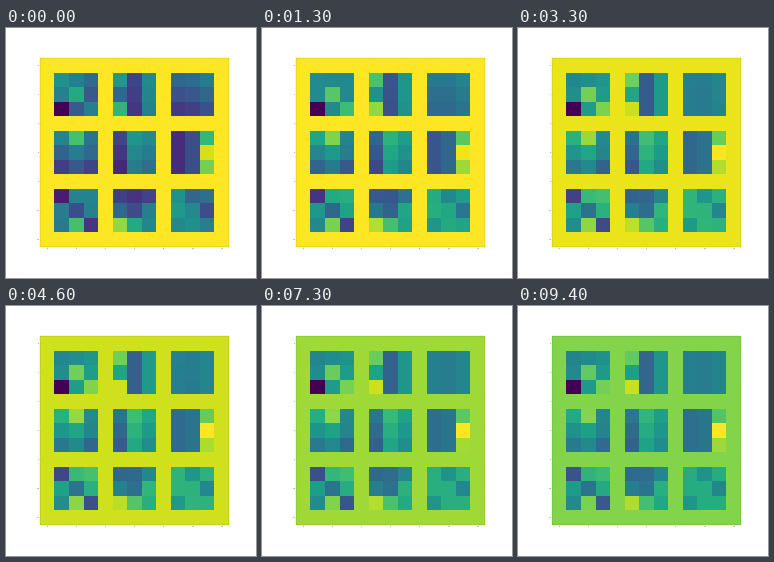
Recreate the animation shown at these times as a matplotlib script. Size 250 by 250 pixels, loop 9500 ms.

```python
import numpy as np
import matplotlib.pyplot as plt
from matplotlib.animation import FuncAnimation

FRAMES, STEP = 95, 100
TAU = 1.3        # settling time of the weights, seconds
DRIFT = .15      # mean rise of a weight during training
N, PAD, SIZE = 3, 1, 13

Y, X = np.mgrid[-1:2, -1:2]


class Kernel:
    """A 3x3 surface with a few outlying cells, reached from a tilted offset."""

    def __init__(self, level, right=0, down=0, bend=0, tilt=(0, 0), spots=()):
        self.end = level + right * X + down * Y + bend * X**2
        for row, col, value in spots:
            self.end[row, col] = value
        offset = tilt[0] * X + tilt[1] * Y - DRIFT
        self.start = np.clip(self.end + offset, 0, 1)

    def at(self, t, level):
        done = 1 - np.exp(-t / TAU)
        spread = 3.5 * (self.end - .4) * (1 - self.end) * (level - LAST)
        change = self.end - self.start + spread
        return np.clip(self.start + change * done, 0, 1)


def border(t):
    """Frame level, sinking once the largest weight passes it."""
    return 1 - .345 * (1 - np.exp(-max(0, t - 2.5) / 9))


LAST = border((FRAMES - 1) * STEP / 1000)

KERNELS = [
    Kernel(.51, .03, .03, tilt=(-.11, -.1),
           spots=[(1, 1, .76), (2, 0, 0), (2, 2, .79)]),
    Kernel(.33, -.12, bend=.31, tilt=(.09, -.02),
           spots=[(1, 0, .57), (2, 0, .92)]),
    Kernel(.42, .01, bend=.02, tilt=(.03, -.08)),
    Kernel(.57, -.03, -.1, -.09, tilt=(.04, -.04),
           spots=[(0, 1, .82), (0, 2, .46)]),
    Kernel(.62, .085, -.04, -.18, tilt=(.045, -.01)),
    Kernel(.39, .245, bend=.22, tilt=(.085, 0),
           spots=[(0, 2, .73), (1, 2, 1)]),
    Kernel(.58, .03, -.07, tilt=(-.025, .055),
           spots=[(0, 0, .26), (1, 1, .39), (2, 1, .8), (2, 2, .28)]),
    Kernel(.53, .1, .17, tilt=(-.05, .06),
           spots=[(0, 0, .35), (1, 1, .38), (2, 0, .88), (2, 2, .6)]),
    Kernel(.62, tilt=(-.07, .03),
           spots=[(0, 1, .51), (1, 2, .46), (2, 0, .52)]),
]


def picture(i):
    t = i * STEP / 1000
    level = border(t)
    grid = np.full((SIZE, SIZE), level)
    for k, kernel in enumerate(KERNELS):
        row, col = (PAD + (N + PAD) * j for j in divmod(k, 3))
        grid[row:row + N, col:col + N] = kernel.at(t, level)
    return grid


fig = plt.figure(figsize=(25, 25), dpi=10, facecolor="white")
ax = fig.add_axes([34 / 250, 31 / 250, 189 / 250, 189 / 250])
image = ax.imshow(picture(0), cmap="viridis", vmin=0, vmax=1,
                  interpolation="nearest")
ax.set_xticks(range(0, SIZE, 2))
ax.set_yticks(range(0, SIZE, 2))


def update(i):
    image.set_data(picture(i))
    return [image]


anim = FuncAnimation(fig, update, frames=FRAMES, interval=STEP,
                     repeat=True, repeat_delay=0)
plt.show()
```
